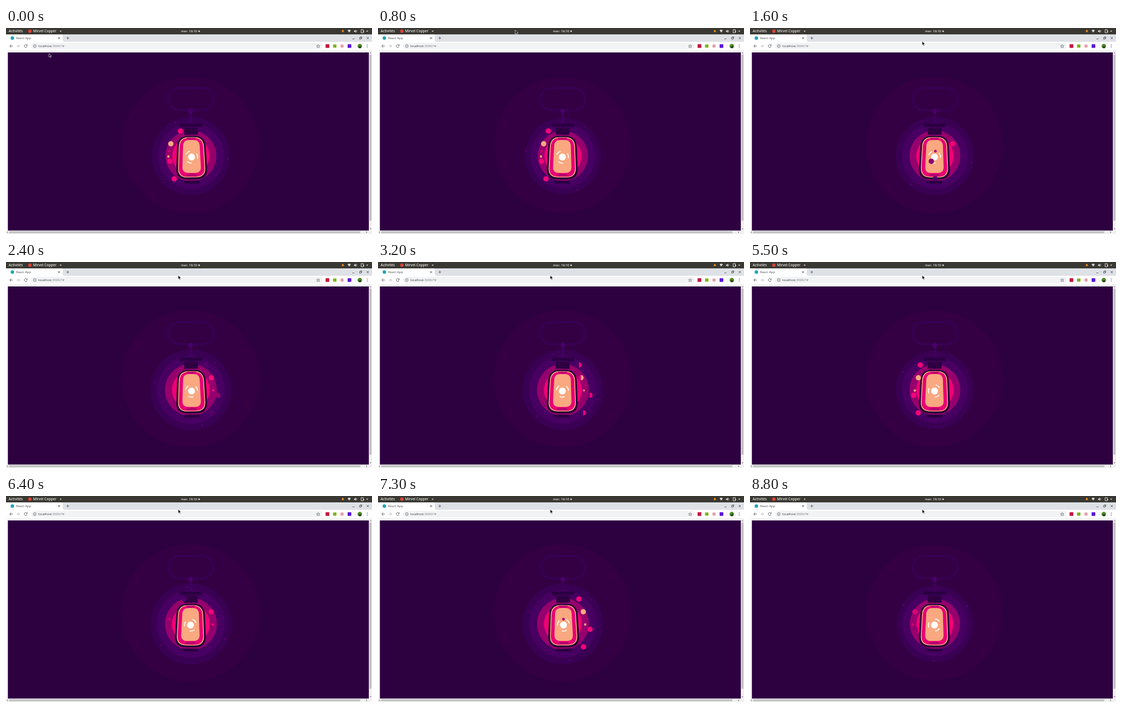
These frames come from a looping animation (690 px wide and 388 px high, 8.9 s). An HTML page:

```html
<!DOCTYPE html>
<html lang="fr">
<head>
<meta charset="utf-8">
<title>React App</title>
<style>
html, body { margin: 0; width: 100%; height: 100%; overflow: hidden; background: #fff; }
svg { display: block; width: 100vw; height: 100vh; }
text { font-family: "Open Sans", "Noto Sans", sans-serif; font-size: 6px; }
.bar text { fill: #e6e4df; font-weight: 600; }
.icon { fill: none; stroke: #55585c; stroke-width: .9; }
</style>
</head>
<body>
<svg viewBox="0 0 690 388">
  <rect width="690" height="388" fill="#fff"/>

  <g class="bar">
    <rect width="690" height="12" fill="#393832"/>
    <text x="5" y="8.3" style="font-size:6.5px">Activités</text>
    <circle cx="45" cy="6" r="3.2" fill="#db4437"/>
    <text x="51" y="8.3" style="font-size:6.5px">Mirvel Copper</text>
    <path d="M101 5h4l-2 2.5z" fill="#d0cec8"/>
    <text x="330" y="8.2">mer. 16:10</text>
    <circle cx="364" cy="6" r="1.5" fill="#e6e4df"/>
    <path d="M632.5 7.5q1-1 1-3 1.500-2 3 0 0 2 1 3z" fill="#f08a1c"/>
    <path d="M644 4.500q3-2.500 6 0l-3 4z" fill="#dcdad5"/>
    <path d="M656 5h1.500l2-2v6l-2-2H656z" fill="#dcdad5"/>
    <path d="M660.500 4q1.500 2 0 4" fill="none" stroke="#dcdad5" stroke-width=".8"/>
    <path d="M669.500 3h4v6h-4zM673 5l2 1-1.500 3" fill="none" stroke="#dcdad5"/>
    <path d="M679 5h4l-2 2.500z" fill="#d0cec8"/>
  </g>

  <rect y="12" width="690" height="14" fill="#dee1e6"/>
  <path d="M0 12H104q3 0 3 3v8q0 3 3 3H0z" fill="#fff"/>
  <circle cx="12" cy="19" r="3.3" fill="#1da5b8"/>
  <text x="19" y="21.200" fill="#45484c">React App</text>
  <g class="icon">
    <path d="M98 17l4 4m0-4l-4 4M114 19h5m-2.500-2.500v5"/>
    <path d="M653 20.500h4M666.500 18h3v3h-3zM668 18v-1.300h2.800v2.800h-1.300M680 17l4 4m0-4l-4 4"/>
  </g>

  <rect x="47" y="28" width="550" height="12" rx="6" fill="#f1f3f4"/>
  <g class="icon">
    <path d="M13 34H7m3-3l-3 3 3 3"/>
    <path d="M20 34h6m-3-3l3 3-3 3" stroke="#b4b6b9"/>
    <path d="M39.500 32.500a2.700 2.700 0 1 0 .2 2.300M40 31v2.200h-2.200"/>
    <circle cx="54.300" cy="34" r="2.700" stroke-width=".7"/>
    <path d="M54.300 33.600v1.900m0-3.200v.7" stroke-width=".7"/>
    <path d="M588.500 31l.9 2.200 2.300.1-1.800 1.400.7 2.300-2.100-1.300-2.100 1.300.7-2.300-1.800-1.400 2.300-.1z" stroke-width=".7"/>
  </g>
  <text x="61" y="36.100" fill="#303236">localhost<tspan fill="#74777b">:3000/?#</tspan></text>
  <rect x="602.500" y="30.500" width="7" height="7" fill="#c3163d"/>
  <rect x="616.500" y="31" width="6.500" height="6" fill="#7fb523"/>
  <circle cx="633.500" cy="34" r="3.200" fill="#e3a3ad"/>
  <rect x="644" y="30.500" width="7" height="7" rx="1" fill="#5a18dd"/>
  <path d="M658 30v8" stroke="#d4d6d8" stroke-width=".6"/>
  <circle cx="667" cy="34" r="4.300" fill="#55902f"/>
  <path d="M664 36a4 4 0 0 0 6 1l-2-4z" fill="#26451e"/>
  <path d="M681 31.500h.1m-.1 2.500h.1m-.1 2.500h.1" stroke="#55585c" stroke-width="1.300" stroke-linecap="round"/>
  <path d="M0 42.300H690" stroke="#dfe0e2" stroke-width=".6"/>

  <rect x="684" y="43" width="6" height="345" fill="#f1f1f1"/>
  <rect y="381.500" width="690" height="6.500" fill="#f1f1f1"/>
  <rect x="685" y="50" width="4" height="313" fill="#c1c1c1"/>
  <rect x="6" y="383" width="662" height="3.500" fill="#c1c1c1"/>
  <path d="M685.500 47.500l1.700-2 1.700 2zM685.500 377.500l1.700 2 1.700-2zM3.500 383l-2 1.700 2 1.700zM679 383l2 1.700-2 1.700z" fill="#777"/>

  <rect x="3.500" y="46" width="680.500" height="335.500" fill="#2d0040"/>
  <circle id="halo" cx="347.500" cy="220" r="129" fill="#340043"/>
  <g id="rings"></g>
  <g id="marks" fill="#680078"></g>
  <g id="back"></g>

  <g fill="none" stroke="#390058" stroke-width="3">
    <rect x="306.500" y="113" width="84" height="42" rx="21"/>
    <path d="M348.500 160v20" stroke="#440067" stroke-width="4" stroke-dasharray="4.500 1.500"/>
  </g>
  <circle cx="348.300" cy="156.500" r="4.300" fill="#4b006c"/>

  <g id="lamp">
    <rect x="327.500" y="180" width="42.500" height="6.500" rx="1" fill="#2b0042"/>
    <rect x="335.500" y="188" width="26" height="13" fill="#2e0041"/>
    <rect x="334" y="287.500" width="29.500" height="5.500" rx="1" fill="#2b0042"/>
    <g id="body"></g>
    <path d="M340 206.500h17l-2 3.500h-13z" fill="#bd006f"/>
    <path d="M338 279l2-4h17l2 4z" fill="#b3006d"/>
    <g id="swirl" fill="none" stroke="#fff" stroke-width="1.700" stroke-linecap="round"></g>
    <circle cx="348.600" cy="243" r="6.500" fill="#fff"/>
  </g>
  <g id="front"></g>
  <path id="cursor" d="M0 0V7.800L1.900 6.100 3.200 9 4.600 8.400 3.300 5.600H5.800z" fill="#111" stroke="#fff" stroke-width=".7"/>
</svg>
<script>
const LOOP = 8900, TAU = Math.PI * 2, CX = 348.6, CY = 241;
const PEACH = [249, 168, 128], PINK = [244, 3, 120], PURPLE = [143, 0, 111], VIOLET = [77, 0, 104];
const $ = id => document.getElementById(id);
const clamp = v => Math.max(0, Math.min(1, v));
const wave = (t, period, shift) => Math.cos(TAU * (t / period - shift));
const rgb = c => `rgb(${c.map(Math.round)})`;
const mix = (a, b, k) => a.map((v, i) => v + (b[i] - v) * k);

function add(parent, tag, attrs) {
  const el = document.createElementNS("http://www.w3.org/2000/svg", tag);
  set(el, attrs);
  return parent.appendChild(el);
}
function set(el, attrs) {
  for (const k in attrs) el.setAttribute(k, attrs[k]);
}

// Rounded trapezoid: half widths a (top) and b (bottom).
function shell(a, b, top, bottom, r, fill) {
  const m = (b - a) * r / (bottom - top);
  const x = v => CX + v;
  add($("body"), "path", { fill, d:
    `M${x(r - a)} ${top}H${x(a - r)}Q${x(a)} ${top} ${x(a + m)} ${top + r}` +
    `L${x(b - m)} ${bottom - r}Q${x(b)} ${bottom} ${x(b - r)} ${bottom}` +
    `H${x(r - b)}Q${x(-b)} ${bottom} ${x(m - b)} ${bottom - r}` +
    `L${x(-a - m)} ${top + r}Q${x(-a)} ${top} ${x(r - a)} ${top}Z` });
}
shell(26, 30, 203, 285, 21, "#210033");
shell(23, 26.5, 205.5, 281.5, 18, rgb(PEACH));
shell(21.3, 24.8, 207, 280, 17, "#e80074");
shell(15.2, 17.8, 211, 273, 11, rgb(PEACH));

const rings = [[74.2, 2.4, "#3a0054"], [62.5, 1.6, "#470062"], [48.2, .9, "#96006d"], [35.5, .4, "#f00075"]]
  .map(([r, amp, fill]) => ({ r, amp, el: add($("rings"), "circle", { cx: CX, cy: CY, fill }) }));

for (let i = 0; i < 3; i++) {
  add($("marks"), "ellipse", { cx: 69.5, rx: 1, ry: 1.6, transform: `rotate(${i * 120})` });
  add($("swirl"), "path", { d: "M11.500 0A11.500 11.500 0 0 1 8.500 7.700", transform: `rotate(${i * 120})` });
}

// y, radius, centre, reach, delay, period, bright tone, dim tone
const orbs = [
  [194, 5, 350, 29, .2, 4500, PINK, VIOLET],
  [218, 5, 349, 38.5, .035, 4500, PEACH, PINK],
  [232, 2.6, 349, 41.5, .03, 5700, [200, 0, 116], PURPLE],
  [242, 2.2, 348.5, 42.5, .05, 4500, PEACH, PINK],
  [251, 5, 354, 46, .12, 4500, PINK, PURPLE],
  [284, 5, 352, 35.5, .11, 4500, PINK, VIOLET]
].map(([y, r, mid, reach, delay, period, bright, dim]) => ({
  y, r, mid, reach, delay, period, bright, dim,
  rear: add($("back"), "circle", { cy: y, r, fill: rgb(dim), opacity: .75 }),
  face: add($("front"), "path", {})
}));

// Part of a disc that has come through the lantern's plane, from its outer edge.
function slice(x, y, r, side, part) {
  if (part <= 0) return "";
  const k = Math.max(-.999, 1 - 2 * part), h = r * Math.sqrt(1 - k * k), cx = x + side * k * r;
  return `M${cx} ${y - h}A${r} ${r} 0 ${k < 0 ? 1 : 0} ${side > 0 ? 1 : 0} ${cx} ${y + h}Z`;
}

function drawOrb(o, t) {
  const p = (t / o.period) % 1;
  const swing = -Math.tanh(3 * wave(t, o.period, o.delay));
  const x = o.mid + o.reach * swing;
  const part = p > .85 ? clamp((p - .956) / .044) : 1 - clamp((p - .689) / .044);
  const shade = clamp((p - .25) / .07) * clamp((.6 - p) / .07);
  set(o.rear, { cx: x, visibility: part < 1 ? "visible" : "hidden" });
  set(o.face, { d: slice(x, o.y, o.r, swing < 0 ? -1 : 1, part), fill: rgb(mix(o.bright, o.dim, shade)) });
}

function drawCursor(t) {
  const k = clamp((t - 100) / 1100), s = k * k * (3 - 2 * k), q = 1 - s;
  const bend = (a, b, c) => q * q * a + 2 * q * s * b + s * s * c;
  const scale = 0.85 + .15 * s;
  set($("cursor"), { transform: `translate(${bend(81, 220, 324.5)} ${bend(48, -30, 25)}) scale(${scale})` });
}

function draw(t) {
  const pulse = wave(t, 4000, .19);
  rings.forEach(g => set(g.el, { r: g.r - g.amp * pulse }));
  set($("halo"), { r: 128.7 - .7 * pulse });
  set($("marks"), { transform: `translate(${CX} ${CY}) rotate(${5 - t * .072})` });
  const tilt = -.8 * Math.tanh(2 * wave(t, 2410, -.03));
  set($("lamp"), { transform: `rotate(${tilt} ${CX} 157)` });
  set($("swirl"), { transform: `translate(${CX} 243) rotate(${-30 + t * .144})` });
  orbs.forEach(o => drawOrb(o, t));
  drawCursor(t);
}

const start = performance.now();
function tick() {
  const t = (performance.now() - start) % LOOP;
  draw(Math.floor(t / 100) * 100);
  requestAnimationFrame(tick);
}
tick();
</script>
</body>
</html>
```
